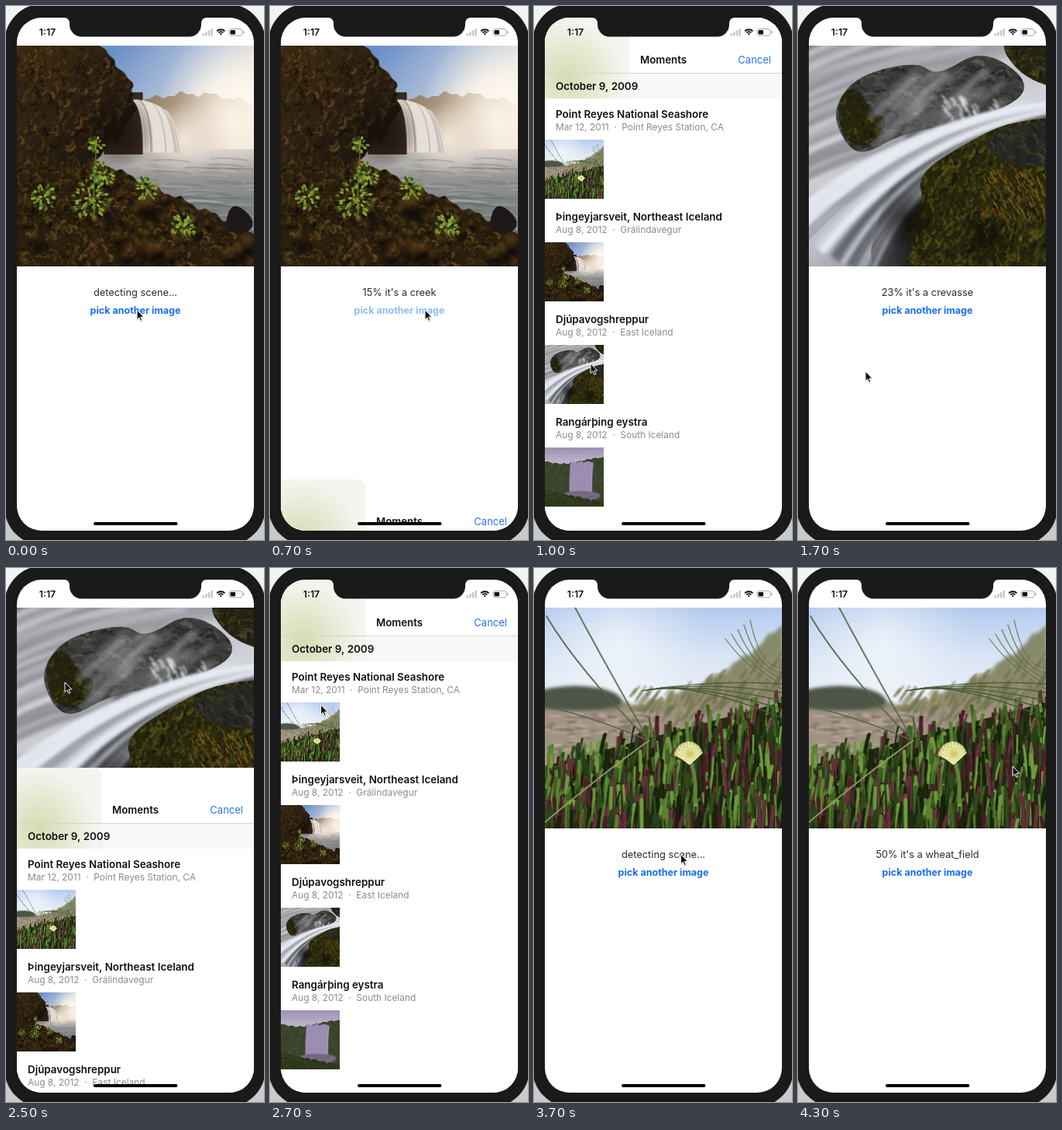
Animation of 333 by 687 pixels, one loop 4.4 s. Source, as an HTML page with a canvas:

```html
<!DOCTYPE html>
<html lang="en">
<head>
<meta charset="utf-8">
<title>Scene detection</title>
<style>
html, body { margin: 0; width: 100%; height: 100%; overflow: hidden; background: #eee; }
canvas { display: block; width: 333px; height: 687px; }
</style>
</head>
<body>
<canvas id="stage" width="333" height="687"></canvas>
<script>
const LOOP = 4400, STEP = 100;
const W = 305, H = 284;
const FONT = 'Inter, "Open Sans", sans-serif';
const ctx = document.getElementById('stage').getContext('2d');

function seeded(seed) {
  return () => {
    seed = (seed + 0x6d2b79f5) | 0;
    let n = Math.imul(seed ^ (seed >>> 15), 1 | seed);
    n = (n + Math.imul(n ^ (n >>> 7), 61 | n)) ^ n;
    return ((n ^ (n >>> 14)) >>> 0) / 4294967296;
  };
}

const rough = x => Math.sin(x * 0.17) * 2.5 + Math.sin(x * 0.41) * 1.5;

// ---- Painting helpers ----

function ramp(g, x1, y1, x2, y2, ...colors) {
  const r = g.createLinearGradient(x1, y1, x2, y2);
  colors.forEach((c, i) => r.addColorStop(i / (colors.length - 1), c));
  return r;
}

function glow(g, x, y, radius, rgb, alpha) {
  const r = g.createRadialGradient(x, y, 0, x, y, radius);
  r.addColorStop(0, `rgba(${rgb},${alpha})`);
  r.addColorStop(1, `rgba(${rgb},0)`);
  g.fillStyle = r;
  g.fillRect(x - radius, y - radius, 2 * radius, 2 * radius);
}

function curve(g, color, width, x1, y1, cx, cy, x2, y2) {
  g.strokeStyle = color;
  g.lineWidth = width;
  g.beginPath();
  g.moveTo(x1, y1);
  g.quadraticCurveTo(cx, cy, x2, y2);
  g.stroke();
}

// Outlines: ground below a height rule, a wall left of an edge rule, a smooth closed blob.
function ground(top) {
  const p = new Path2D();
  for (let x = -3; x <= W + 3; x += 3) p.lineTo(x, top(x));
  p.lineTo(W + 3, H);
  p.lineTo(-3, H);
  return p;
}

function wall(edge, height) {
  const p = new Path2D();
  for (let y = 0; y <= height; y += 3) p.lineTo(edge(y), y);
  p.lineTo(0, height);
  p.lineTo(0, 0);
  return p;
}

function blob(...points) {
  const p = new Path2D();
  points.forEach(([x, y], i) => {
    const [nx, ny] = points[(i + 1) % points.length];
    if (!i) {
      const [lx, ly] = points[points.length - 1];
      p.moveTo((lx + x) / 2, (ly + y) / 2);
    }
    p.quadraticCurveTo(x, y, (x + nx) / 2, (y + ny) / 2);
  });
  return p;
}

// Fills an outline and textures it with short strokes along an angle.
function textured(g, path, base, colors, { seed = 1, count = 1500, size = 6, angle = 0, spread = 1.6 } = {}) {
  const rnd = seeded(seed);
  g.save();
  g.fillStyle = base;
  g.fill(path);
  g.clip(path);
  for (let i = 0; i < count; i++) {
    const x = rnd() * W, y = rnd() * H, len = size * (0.4 + rnd());
    const a = angle + (rnd() - 0.5) * 2 * spread;
    g.globalAlpha = 0.15 + rnd() * 0.5;
    curve(g, colors[Math.floor(rnd() * colors.length)], 1 + rnd() * 3,
      x, y, x + Math.cos(a) * len, y + Math.sin(a) * len, x + Math.cos(a + 0.6) * len, y + Math.sin(a + 0.6) * len);
  }
  g.restore();
}

function picture(draw) {
  const c = document.createElement('canvas');
  c.width = W;
  c.height = H;
  const g = c.getContext('2d');
  g.lineCap = 'round';
  draw(g);
  return c;
}

// ---- Pictures ----

const creek = picture(g => {
  const rnd = seeded(11);
  g.fillStyle = ramp(g, 130, 0, 240, 100, '#6b8fc8', '#a5b9d6', '#e9e1d8');
  g.fillRect(0, 0, W, H);
  glow(g, 284, 72, 100, '255,250,242', 1);
  g.fillStyle = ramp(g, 150, 70, 290, 110, '#8c7860', '#b5a18a', '#efe5d8');
  g.fill(ground(x => 62 + (x - 225) ** 2 / 450 + rough(x)));
  g.fillStyle = ramp(g, 0, 131, 0, 245, '#c5bfb8', '#959594', '#7e8283', '#6a6f70');
  g.fillRect(0, 133, W, H);
  glow(g, 275, 95, 75, '255,246,234', 0.9);
  glow(g, 215, 122, 50, '248,238,226', 0.9);
  for (let i = 0; i < 70; i++) {
    const x = 100 + rnd() * 200, y = 145 + rnd() * 95;
    curve(g, i % 2 ? 'rgba(215,216,214,.2)' : 'rgba(75,80,82,.22)', 2, x, y, x + 20, y - 2, x + 45, y + 2);
  }
  g.fillStyle = '#382a20';
  g.fillRect(112, 60, 50, 80);
  g.filter = 'blur(.7px)';
  for (let i = 0; i <= 45; i++) {
    const k = i / 45, x = 150 + 42 * k, y = 70 + 14 * k * k;
    curve(g, rnd() < 0.75 ? '#e6dfd8' : '#aaa097', 1.6, x, y, x + 13, y + 12, x + 13 + 5 * k, 137);
  }
  g.filter = 'none';
  textured(g, wall(y => 106 + 46 * Math.sin(y / 46) + rough(y), 165), ramp(g, 0, 0, 140, 150, '#3a2912', '#2d2012', '#17110c'),
    ['#120d08', '#1d150c', '#543b18', '#6f5125', '#33270f'], { seed: 4, count: 2600, size: 8, angle: 1.4, spread: 0.9 });
  glow(g, 128, 112, 48, '20,14,10', 0.85);
  const shore = x => 152 + Math.max(0, x - 112) * 0.46 + rough(x);
  textured(g, ground(shore), '#2a1e0e',
    ['#100b06', '#1a120a', '#5b401b', '#7a5526', '#454414', '#2b240d'], { seed: 9, count: 3300, size: 7 });
  for (let i = 0; i < 34; i++) {
    const x = rnd() * W, y = shore(x) + 10 + rnd() * 110, r = 8 + rnd() * 12;
    glow(g, x, y, r, '12,8,5', 0.75);
    glow(g, x - 3, y - r * 0.8, r * 0.7, '130,88,36', 0.4);
  }
  g.fillStyle = '#1c1918';
  g.fill(blob([266, 240], [274, 205], [290, 208], [306, 226], [298, 242]));
  // Leafy clumps: x, y, radius.
  [[102, 127, 10], [94, 196, 27], [112, 165, 16], [166, 184, 15], [214, 232, 16], [35, 195, 16]].forEach(([x, y, r]) => {
    for (let i = 0; i < r * 3.5; i++) {
      const a = rnd() * 6.28, d = Math.sqrt(rnd()) * r;
      g.fillStyle = ['#7f9431', '#55702a', '#94a83e', '#354c1c'][i % 4];
      g.beginPath();
      g.ellipse(x + Math.cos(a) * d, y + Math.sin(a) * d, 2.6, 1.5, a, 0, 7);
      g.fill();
    }
  });
  curve(g, '#6f862e', 1.3, 102, 135, 98, 180, 99, 225);
});

const rapids = picture(g => {
  const rnd = seeded(21);
  g.fillStyle = ramp(g, 0, 0, 130, 284, '#85868a', '#b9bbc1', '#d9dae2', '#85878e');
  g.fillRect(0, 0, W, H);
  g.filter = 'blur(3px)';
  for (let i = 0; i < 80; i++) {
    const y = rnd() * 230 - 50;
    curve(g, i % 2 ? 'rgba(245,245,250,.4)' : 'rgba(75,77,82,.3)', 3 + rnd() * 6,
      -5, y + 45, 60, y + 10, 150 + rnd() * 150, y - 20);
  }
  g.filter = 'none';
  textured(g, blob([30, 82], [62, 38], [140, 20], [165, 40], [225, 2], [295, 55], [220, 96], [120, 112], [70, 142], [45, 125]),
    '#3b3b39', ['#1b1b1a', '#2a2a28', '#565655', '#666767'], { seed: 14, count: 1500, size: 13, angle: -0.3, spread: 0.5 });
  textured(g, blob([34, 72], [60, 48], [80, 85], [104, 95], [80, 130], [46, 126]),
    '#25240e', ['#55521a', '#14140a', '#3d3b10'], { seed: 6, count: 2200, size: 5, angle: 1.5 });
  g.filter = 'blur(3px)';
  for (let i = 0; i < 60; i++) {
    const x = 125 + rnd() * 135, y = 25 + rnd() * 60;
    curve(g, i % 3 ? 'rgba(190,191,194,.35)' : 'rgba(45,45,45,.45)', 3 + rnd() * 4,
      x, y, x - 20, y + 12, x - 35 - rnd() * 25, y + 48);
  }
  g.filter = 'blur(1px)';
  for (let i = 0; i < 26; i++) {
    const x = 165 + rnd() * 75, y = 62 + rnd() * 28;
    curve(g, 'rgba(240,240,245,.5)', 3, x, y, x + 4, y + 2, x + 5, y + 9);
  }
  g.filter = 'none';
  textured(g, blob([240, -12], [330, -12], [330, 60], [270, 38]),
    '#24220f', ['#5b5719', '#151411', '#454444'], { seed: 5, count: 2500 });
  g.fillStyle = ramp(g, 70, 0, 140, 0, '#55565a', '#191919');
  g.fill(blob([70, 300], [95, 200], [130, 140], [190, 130], [170, 300]));
  g.filter = 'blur(2.5px)';
  for (let i = 0; i < 90; i++) {
    const k = rnd(), light = rnd() > 0.15 + k * 0.45;
    curve(g, light ? 'rgba(236,237,245,.5)' : 'rgba(70,72,78,.45)', 2 + rnd() * 5,
      310, 76 + k * 20, 130 + k * 10, 90 + k * 55, k * 135 - 45, 230 + k * 70);
  }
  g.filter = 'none';
  textured(g, blob([138, 165], [215, 118], [260, 98], [340, 90], [340, 320], [90, 320], [140, 262], [120, 232], [150, 205]),
    '#27260d', ['#55531a', '#11110a', '#3f3e10', '#66611d', '#1d1c0c'], { seed: 17, count: 4200, size: 7, angle: 1.3, spread: 0.8 });
  textured(g, blob([220, 122], [255, 103], [330, 95], [330, 158], [250, 152]),
    '#272725', ['#454543', '#171716', '#3b390f'], { seed: 19, count: 3000, size: 9, angle: 0.2, spread: 0.5 });
  for (let i = 0; i < 150; i++) {
    const x = 222 + rnd() * 80, y = 155 + rnd() * 68;
    curve(g, ['#76501a', '#8d6220', '#3e320d'][i % 3], 1.2, x, y, x + 1, y + 3, x + 3, y + 6);
  }
  glow(g, 128, 225, 40, '12,12,8', 0.8);
  glow(g, 225, 250, 45, '10,10,5', 0.6);
});

const field = picture(g => {
  const rnd = seeded(33);
  g.fillStyle = ramp(g, 0, 0, 0, 125, '#b4cbee', '#d9e5f5', '#eef1f6');
  g.fillRect(0, 0, W, H);
  glow(g, 95, 45, 110, '255,255,255', 0.6);
  g.filter = 'blur(2px)';
  g.fillStyle = ramp(g, 200, 65, 220, 170, '#858a6b', '#8f8a6c', '#6b6848');
  g.fill(ground(x => 124 - Math.max(0, x - 95) ** 2 / 430 + rough(x)));
  g.fillStyle = '#a19384';
  g.fill(ground(x => 125 + 8 * Math.sin(x / 70) + rough(x)));
  g.fillStyle = '#4d5546';
  g.fill(blob([-20, 108], [40, 98], [95, 108], [105, 132], [-20, 132]));
  g.filter = 'blur(1px)';
  for (let i = 0; i < 260; i++) {
    const x = 105 + rnd() * 200, y = 110 + rnd() * 45 - Math.max(0, x - 165) * 0.35;
    curve(g, ['#5f6945', '#a09773', '#72754d'][i % 3], 1.5, x, y, x + 3, y - 5, x + 7, y - 10);
  }
  for (let i = 0; i < 130; i++) {
    const x = rnd() * 135, y = 135 + rnd() * 55;
    curve(g, i % 2 ? '#7d7062' : '#b9ab9a', 2, x, y, x + 5, y - 1, x + 9, y);
  }
  g.filter = 'none';
  const top = x => 204 - x * 0.27;
  g.fillStyle = '#212b12';
  g.fill(ground(top));
  const tones = ['#3f5f22', '#5b8030', '#28401a', '#4a1d27', '#2f481c', '#64303a', '#18220c', '#6f9a3e'];
  for (let i = 0; i < 620; i++) {
    const k = i / 620, x = rnd() * 312 - 3, y = top(x) + k * (H + 15 - top(x));
    const len = 12 + rnd() * 14 + k * 10, lean = rnd() * 10 - 4, tone = tones[Math.floor(rnd() * tones.length)];
    curve(g, tone, 2 + rnd() * 3.5, x, y + len * 0.5, x, y - len * 0.3, x + lean, y - len);
    curve(g, 'rgba(15,20,8,.5)', 1.5, x + 3, y + len * 0.5, x + 3, y, x + 3 + lean * 0.4, y - len * 0.5);
  }
  curve(g, '#5f8438', 5, 188, 199, 196, 222, 193, 250);
  for (let i = 0; i < 22; i++) {
    const a = -2.95 + i * 0.125;
    curve(g, i % 2 ? '#f3f0bd' : '#dedb8b', 2, 186, 201, 186 + Math.cos(a) * 9, 194, 185 + Math.cos(a) * 18, 193 + Math.sin(a) * 20);
  }
  glow(g, 187, 188, 8, '205,190,75', 0.9);
  // Long blades meeting at one root, then a spray bending right.
  [[2, 11], [39, 0], [0, 127], [0, 276]].forEach(([x, y]) =>
    curve(g, y > 200 ? '#93a066' : '#54654a', 1.7, x, y, 40 + x + y / 8, (y + 150) / 2, 134, 171));
  for (let i = 0; i < 5; i++) {
    curve(g, '#4a5a3a', 1.3, 125 + 6 * i, 107 - i, 215, 92 + 3 * i, W, 98 + 11 * i);
    curve(g, '#657252', 1.1, 232 + 8 * i, 40 - 6 * i, 262 + 4 * i, 80, W, 105 - 7 * i);
  }
});

const falls = picture(g => {
  g.fillStyle = ramp(g, 0, 0, 0, 110, '#9c92b2', '#cfc7d9');
  g.fillRect(0, 0, W, H);
  textured(g, ground(x => 64 + 14 * Math.sin(x / 60) + rough(x)), '#39442b',
    ['#293521', '#556039', '#3d3b38', '#4b5533'], { seed: 8, count: 1800, size: 12, angle: 1.3 });
  g.filter = 'blur(2px)';
  for (let i = 0; i < 36; i++) {
    const x = 130 + i * 3;
    curve(g, i % 3 ? '#b3a3c9' : '#8b79a8', 5, x + 6, 72 + rough(x), x, 130, x, 222);
  }
  g.fillStyle = '#74677f';
  g.fill(blob([60, 232], [160, 205], [300, 222], [230, 268], [110, 262]));
  g.filter = 'none';
  textured(g, ground(x => 205 + x * 0.2 + rough(x)), '#2c371c', ['#4b592c', '#202813'], { seed: 12, size: 9 });
});

// ---- Interface ----

const rows = [
  ['Point Reyes National Seashore', 'Mar 12, 2011  ·  Point Reyes Station, CA', field],
  ['Þingeyjarsveit, Northeast Iceland', 'Aug 8, 2012  ·  Grálindavegur', creek],
  ['Djúpavogshreppur', 'Aug 8, 2012  ·  East Iceland', rapids],
  ['Rangárþing eystra', 'Aug 8, 2012  ·  South Iceland', falls]
];
const scenes = [
  { start: 0, known: 300, photo: creek, label: "15% it's a creek" },
  { start: 1250, known: 1600, photo: rapids, label: "23% it's a crevasse" },
  { start: 3062, known: 3900, photo: field, label: "50% it's a wheat_field" }
];
const picks = [{ show: 678, hide: 1250 }, { show: 2411, hide: 3062 }];

// Pointer stops: time, x, y.
const stops = [
  [0, 169, 391], [500, 169, 391], [700, 200, 391], [1000, 73, 460], [1700, 87, 470], [2000, 169, 391],
  [2250, 169, 391], [2500, 76, 147], [2900, 55, 205], [3200, 146, 308], [3600, 172, 391], [4200, 277, 255], [LOOP, 277, 255]
];

function text(s, x, y, size, weight, color, align = 'left') {
  ctx.font = `${weight} ${size}px ${FONT}`;
  ctx.fillStyle = color;
  ctx.textAlign = align;
  ctx.fillText(s, x, y);
}

function rounded(x, y, w, h, r, color) {
  ctx.fillStyle = color;
  ctx.beginPath();
  ctx.roundRect(x, y, w, h, r);
  ctx.fill();
}

// Critically damped spring: 1 at rest, falling to 0.
function settle(ms) {
  const u = Math.max(0, ms) * 0.024;
  return (1 + u) * Math.exp(-u);
}

function sheetOffset(t) {
  const pick = picks.filter(p => p.show <= t).pop();
  if (!pick) return 660;
  if (t < pick.hide) return Math.max(0, 664 * settle(t - pick.show) - 4);
  return 660 * (1 - settle(t - pick.hide));
}

function drawApp(t) {
  const scene = scenes.filter(s => s.start <= t).pop();
  const pressed = picks.some(p => t >= p.show - 100 && t < p.hide);
  ctx.fillStyle = '#fff';
  ctx.fillRect(14, 15, 306, 660);
  ctx.drawImage(scene.photo, 14, 51, 306, H);
  text(t < scene.known ? 'detecting scene...' : scene.label, 167, 373, 12.8, 400, '#2b2b2b', 'center');
  text('pick another image', 167, 396.3, 12.5, 700, pressed ? '#8dbcfb' : '#176ff5', 'center');
}

function drawSheet(offset) {
  if (offset > 657) return;
  ctx.save();
  ctx.translate(0, Math.round(offset));
  ctx.fillStyle = '#fff';
  ctx.fillRect(14, 15, 306, 660);
  ctx.fillStyle = '#f7f7f6';
  ctx.fillRect(14, 87, 306, 32);
  ctx.save();
  ctx.beginPath();
  ctx.roundRect(14, 15, 110, 104, [0, 12, 0, 0]);
  ctx.clip();
  ctx.fillStyle = '#f4f5f1';
  ctx.fillRect(14, 15, 110, 104);
  glow(ctx, 42, 92, 76, '211,221,176', 1);
  ctx.restore();
  ctx.fillStyle = '#d4d4d2';
  ctx.fillRect(14, 86, 306, 1);
  text('Moments', 167, 73.5, 13.3, 600, '#111', 'center');
  text('Cancel', 306, 73.5, 13, 400, '#2472f3', 'right');
  text('October 9, 2009', 28, 107.7, 13.4, 600, '#111');
  rows.forEach(([title, sub, photo], i) => {
    const top = 132 * i;
    text(title, 28, 144 + top, 13.4, 600, '#111');
    text(sub, 28, 160.3 + top, 11.9, 400, '#8b8b8f');
    ctx.drawImage(photo, 10, 0, H, H, 14, 172 + top, 76, 75.5);
  });
  ctx.restore();
}

function drawStatus() {
  text('1:17', 53.5, 38.3, 12.3, 600, '#111', 'center');
  for (let i = 0; i < 4; i++) rounded(253.5 + i * 3.7, 35 - i * 2, 2.5, 3.5 + i * 2, 0.7, '#c9c9c9');
  ctx.strokeStyle = '#111';
  ctx.lineWidth = 1.9;
  for (let r = 1.3; r < 8; r += 3) {
    ctx.beginPath();
    ctx.arc(277.3, 37.5, r, -2.35, -0.79);
    ctx.stroke();
  }
  ctx.strokeStyle = '#a9a9a9';
  ctx.lineWidth = 1;
  ctx.beginPath();
  ctx.roundRect(288, 29.5, 17, 8.5, 2.5);
  ctx.stroke();
  rounded(306, 32, 1.3, 3.5, 0.6, '#a9a9a9');
  rounded(289.5, 31, 6.5, 5.5, 1, '#111');
}

function drawNotch() {
  rounded(82, 8, 170, 31.5, 17, '#1a1a1a');
  // Flared shoulders on both sides.
  [[82, -1], [252, 1]].forEach(([x, side]) => {
    ctx.beginPath();
    ctx.moveTo(x + 7 * side, 14);
    ctx.lineTo(x + 7 * side, 15);
    ctx.quadraticCurveTo(x, 15, x, 23);
    ctx.lineTo(x - 9 * side, 23);
    ctx.lineTo(x - 9 * side, 14);
    ctx.fill();
  });
}

function drawCursor(t) {
  const i = stops.findIndex(s => s[0] > t);
  const [t0, x0, y0] = stops[i - 1], [t1, x1, y1] = stops[i];
  const k = (t - t0) / (t1 - t0);
  ctx.save();
  ctx.translate(x0 + (x1 - x0) * k, y0 + (y1 - y0) * k);
  ctx.shadowColor = 'rgba(0,0,0,.35)';
  ctx.shadowBlur = 2;
  ctx.shadowOffsetY = 1;
  ctx.fillStyle = '#111';
  const arrow = new Path2D('M0 0V12.5L2.8 9.9 4.8 14.3 6.8 13.4 4.9 9.2 8.8 9Z');
  ctx.fill(arrow);
  ctx.shadowColor = 'transparent';
  ctx.strokeStyle = '#fff';
  ctx.lineWidth = 1;
  ctx.stroke(arrow);
  ctx.restore();
}

function draw(t) {
  ctx.fillStyle = ramp(ctx, 0, 0, 0, 687, '#f3f3f3', '#e6e6e6', '#c9c9c9');
  ctx.fillRect(0, 0, 333, 687);
  rounded(-2, -3, 337, 697, 50, '#1a1a1a');
  ctx.save();
  ctx.beginPath();
  ctx.roundRect(14, 15, 306, 660, 32);
  ctx.clip();
  drawApp(t);
  drawSheet(sheetOffset(t));
  drawStatus();
  rounded(113, 664, 108.5, 4, 2, '#000');
  ctx.restore();
  drawNotch();
  drawCursor(t);
}

function tick(now) {
  draw(Math.floor((now % LOOP) / STEP) * STEP);
  requestAnimationFrame(tick);
}
requestAnimationFrame(tick);
</script>
</body>
</html>
```
